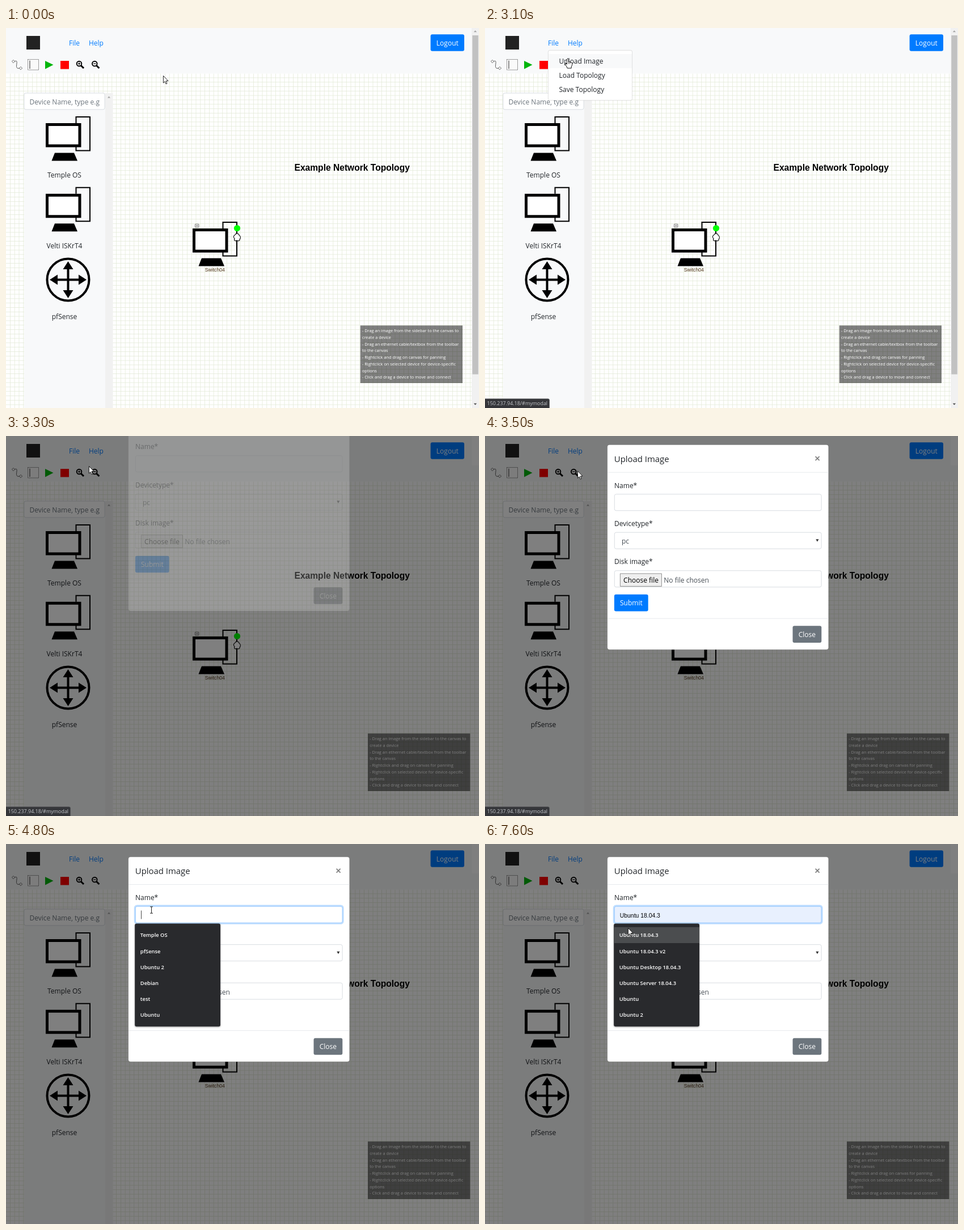
Recreate the animation shown at these times as an HTML page with a canvas. Size 834 px wide and 671 px high, loop 8 s.

```html
<!DOCTYPE html>
<html lang="en">
<head>
<meta charset="utf-8">
<title>Upload an image</title>
<style>
html, body { margin: 0; width: 100%; height: 100%; overflow: hidden; background: #fff; }
canvas { display: block; }
</style>
</head>
<body>
<canvas id="stage" width="834" height="671"></canvas>
<script>
const W = 834, H = 671, LOOP = 8000, STEP = 100;
const stage = document.getElementById('stage').getContext('2d');
const layer = Object.assign(document.createElement('canvas'), { width: W, height: H }).getContext('2d');
let c = stage;
const UI = '"Open Sans", "Noto Sans", sans-serif';
const ARIAL = '"Liberation Sans", Arial, sans-serif';
const INK = '#212529', BLUE = '#007bff', PALE = '#f8f9fa', EDGE = '#ced4da';

const clamp = v => Math.max(0, Math.min(1, v));
const smooth = p => p * p * (3 - 2 * p);

function easeOut(x) {
  let lo = 0, hi = 1, s = 0.5;
  for (let i = 0; i < 20; i++) {
    s = (lo + hi) / 2;
    if (3 * (1 - s) * s * s * 0.58 + s * s * s < x) lo = s; else hi = s;
  }
  return 3 * (1 - s) * s * s + s * s * s;
}

function rect(x, y, w, h, fill) {
  c.fillStyle = fill;
  c.fillRect(x, y, w, h);
}

function box(x, y, w, h, r, fill, stroke, width = 0.8) {
  c.beginPath();
  c.roundRect(x, y, w, h, r);
  if (fill) { c.fillStyle = fill; c.fill(); }
  if (stroke) { c.strokeStyle = stroke; c.lineWidth = width; c.stroke(); }
}

function text(s, x, y, color = INK, size = 12, align = 'left', family = UI, weight = 400) {
  c.font = `${weight} ${size}px ${family}`;
  c.textAlign = align;
  c.fillStyle = color;
  c.fillText(s, x, y);
}

function poly(points, fill, stroke, width = 1, close = true) {
  c.beginPath();
  points.forEach(([x, y]) => c.lineTo(x, y));
  if (close) c.closePath();
  if (fill) { c.fillStyle = fill; c.fill(); }
  if (stroke) { c.strokeStyle = stroke; c.lineWidth = width; c.stroke(); }
}

function disc(x, y, r, fill, stroke, width) {
  c.beginPath();
  c.arc(x, y, r, 0, Math.PI * 2);
  if (fill) { c.fillStyle = fill; c.fill(); }
  if (stroke) { c.strokeStyle = stroke; c.lineWidth = width; c.stroke(); }
}

function button(label, x, y, w, fill) {
  box(x, y, w, 29.6, 3, fill);
  text(label, x + w / 2, y + 19.5, '#fff', 12, 'center');
}

function at(x, y, draw) {
  c.save();
  c.translate(x, y);
  draw();
  c.restore();
}

// Draws a group on its own layer, then blends it in as one picture.
function group(alpha, dy, draw) {
  c = layer;
  c.clearRect(0, 0, W, H);
  at(0, dy, draw);
  c = stage;
  c.globalAlpha = alpha;
  c.drawImage(layer.canvas, 0, 0);
  c.globalAlpha = 1;
}

// Page

function grid() {
  const gap = 7.8, top = 80.5;
  rect(0, top, W, H - top, '#fff');
  for (let x = 7; x < W; x += gap) rect(x, top, 0.78, H - top, '#e3ead8');
  for (let y = top + 7; y < H; y += gap) rect(0, y, W, 0.78, '#e3ead8');
}

function computer(x, y) {
  at(x, y, () => {
    poly([[53.5, 12], [53.5, 1], [78, 1], [78, 60.5], [53.5, 60.5], [53.5, 54]], null, '#000', 2, false);
    box(2.5, 14.5, 57.5, 37.5, 0, '#fff', '#000', 5);
    poly([[16, 64.5], [50, 64.5], [56, 78.5], [10.5, 78.5]], '#000');
  });
}

function routerIcon() {
  at(109.5, 444.5, () => {
    disc(0, 0, 37, null, '#000', 4);
    for (let i = 0; i < 4; i++) {
      rect(-2, -24, 4, 24, '#000');
      poly([[0, -32.5], [9, -18.5], [-9, -18.5]], '#000');
      c.rotate(Math.PI / 2);
    }
  });
}

function lens(x, plus) {
  disc(x, 63, 4.3, '#fff', '#000', 1.9);
  poly([[x + 3.2, 66.2], [x + 8, 71]], null, '#000', 3, false);
  rect(x - 2.3, 62.4, 4.6, 1.2, '#000');
  if (plus) rect(x - 0.6, 60.7, 1.2, 4.6, '#000');
}

function toolbar() {
  c.beginPath();
  c.moveTo(15, 59);
  c.bezierCurveTo(25, 54, 12, 74, 24, 71);
  c.strokeStyle = '#555';
  c.lineWidth = 1;
  c.stroke();
  for (const [x, y] of [[13, 59], [26, 71]])
    poly([[x - 2.6, y], [x, y - 2.6], [x + 2.6, y], [x, y + 2.6]], '#fff', '#555', 0.9);
  c.setLineDash([1, 1]);
  box(38.5, 55.5, 19, 18.5, 0, '#fafafa', '#444', 1);
  c.setLineDash([]);
  rect(41.5, 57.5, 1, 14.5, '#222');
  poly([[69, 58], [83.5, 65], [69, 72.5]], '#00b50c');
  rect(96, 58, 15, 14.5, '#f00');
  lens(129, true);
  lens(156.3, false);
}

function device() {
  computer(329, 342);
  box(333.5, 346.3, 6.4, 5.6, 0.5, '#fff', '#555', 0.8);
  rect(335, 348.7, 3.5, 0.9, '#222');
  disc(407.5, 353.5, 5.6, '#0f0');
  c.beginPath();
  c.moveTo(404, 365.5);
  c.bezierCurveTo(404, 362, 411, 362, 411, 366);
  c.bezierCurveTo(414, 367, 414, 372, 412, 373);
  c.bezierCurveTo(413, 376, 408, 376.5, 407, 375);
  c.bezierCurveTo(404, 377, 401.5, 375, 403, 372);
  c.bezierCurveTo(400.5, 370, 401, 366, 404, 365.5);
  c.fillStyle = '#fff';
  c.fill();
  c.strokeStyle = '#000';
  c.lineWidth = 1.1;
  c.stroke();
  text('Switch04', 368.3, 430.3, '#4a3010', 8.6, 'center', ARIAL);
}

const TIPS = [
  '- Drag an image from the sidebar to the canvas to', 'create a device',
  '- Drag an ethernet cable/textbox from the toolbar', 'to the canvas',
  '- Rightclick and drag on canvas for panning',
  '- Rightclick on selected device for device-specific', 'options',
  '- Click and drag a device to move and connect'
];

function sidebar() {
  rect(32, 115, 143, H - 115, PALE);
  rect(175, 115, 13.5, H - 115, '#f1f1f1');
  poly([[179, 123.5], [181.5, 120.5], [184, 123.5]], '#a3a3a3');
  box(31.9, 114.9, 142.2, 29, 3, '#fff', EDGE);
  text('Device Name, type e.g', 41.5, 135, '#6c757d');
  computer(70, 156);
  text('Temple OS', 103, 264, INK, 12, 'center');
  computer(70, 280.7);
  text('Velti ISKrT4', 103, 388.5, INK, 12, 'center');
  routerIcon();
  text('pfSense', 103, 513.5, INK, 12, 'center');
}

function page(t) {
  const locked = t >= 3200, hover = t >= 1800 && t < 2600;
  grid();
  rect(0, 0, W, 80.5, PALE);
  if (locked) rect(821, 0, 13, 52, '#fff');
  rect(36, 14, 24, 24, '#222');
  text('File', 111, 31, hover ? '#0056b3' : BLUE);
  if (hover) rect(111, 32.6, 19, 0.9, '#0056b3');
  text('Help', 146, 31, BLUE);
  button('Logout', 748.6, 11.2, 59.4, BLUE);
  toolbar();
  sidebar();
  text('Example Network Topology', 508.5, 251.5, '#000', 15.6, 'left', ARIAL, 700);
  device();

  const tipX = locked ? 638 : 624.7;
  rect(tipX, 525.3, 180.3, 101.7, 'rgba(0,0,0,.5)');
  TIPS.forEach((s, i) => text(s, tipX + 3.2, 537 + i * 11.75, '#fff', 7.4, 'left', UI, 500));

  if (!locked) {
    rect(821, 0, 13, H, '#f1f1f1');
    rect(822.3, 13, 10.5, 598.5, '#c1c1c1');
    poly([[824.7, 7.2], [827.4, 4.2], [830.1, 7.2]], '#a3a3a3');
    poly([[824.7, 662.8], [827.4, 665.8], [830.1, 662.8]], '#505050');
  }
}

function fileMenu(t) {
  if (t < 2100 || t >= 3200) return;
  box(111.4, 39.4, 148.2, 88.4, 3, '#fff', 'rgba(0,0,0,.15)');
  if (t >= 2800) rect(112, 46, 147, 25, PALE);
  ['Upload Image', 'Load Topology', 'Save Topology'].forEach((s, i) =>
    text(s, 130.5, 62.7 + i * 25));
}

// Dialog

const HISTORY = ['Temple OS', 'pfSense', 'Ubuntu 2', 'Debian', 'test', 'Ubuntu'];
const MATCHES = ['Ubuntu 18.04.3', 'Ubuntu 18.04.3 v2', 'Ubuntu Desktop 18.04.3',
  'Ubuntu Server 18.04.3', 'Ubuntu', 'Ubuntu 2'];
const KEYS = [5400, 6000, 6300, 6600, 6900, 7100];

function nameField(t) {
  const focus = t >= 4500, filled = t >= 7300;
  if (focus) box(227, 108.7, 367.4, 31.8, 4, null, 'rgba(0,123,255,.25)', 2.5);
  box(228.3, 110.2, 364.8, 29, 3, filled ? '#e8f0fe' : '#fff', focus ? '#80bdff' : EDGE);
  if (filled) {
    text('Ubuntu 18.04.3', 237.8, 130, '#000', 10.4, 'left', ARIAL);
    return;
  }
  const typed = 'ubuntu'.slice(0, KEYS.filter(k => t >= k).length);
  text(typed, 238, 130, '#495057');
  const blank = (t >= 5200 && t < 5400) || (t >= 5900 && t < 6000);
  if (focus && !blank) rect(238 + c.measureText(typed).width, 117.5, 0.9, 15, '#333');
}

function form(t) {
  box(215.7, 22.8, 390, 361.8, 4, '#fff', 'rgba(0,0,0,.2)');
  text('Upload Image', 227.8, 53.2, INK, 14.9, 'left', UI, 500);
  poly([[582.6, 43.6], [589.6, 50.6]], null, '#7f7f7f', 1.7, false);
  poly([[589.6, 43.6], [582.6, 50.6]], null, '#7f7f7f', 1.7, false);
  rect(216, 71.2, 389.4, 0.8, '#e2e5e9');
  text('Name*', 228, 99);
  nameField(t);
  text('Devicetype*', 228, 166.3);
  box(228.3, 177.6, 364.8, 29, 3, '#fff', EDGE);
  text('pc', 241, 197.7, '#495057');
  poly([[583.3, 189.7], [588.5, 189.7], [585.9, 194.2]], '#333');
  text('Disk image*', 228, 233.8);
  box(228.3, 245.2, 364.8, 29, 3, '#fff', EDGE);
  box(238.4, 250.4, 73, 22.4, 0, '#efefef', '#767676');
  text('Choose file', 275, 266.3, '#000', 12, 'center');
  text('No file chosen', 315.3, 266.3, '#495057');
  button('Submit', 227.9, 287.2, 59.8, BLUE);
  rect(216, 329.2, 389.4, 0.8, '#e2e5e9');
  button('Close', 542.5, 342.7, 50.8, '#6c757d');
}

function dialog(t) {
  const age = t - 3270;
  if (age < 0) return;
  group(clamp(age / 150), -90 * (1 - easeOut(clamp(age / 300))), () => form(t));
}

function suggestions(t) {
  if (t < 4800) return;
  c.save();
  c.shadowColor = 'rgba(0,0,0,.4)';
  c.shadowBlur = 3;
  c.shadowOffsetY = 1;
  box(227.2, 140.6, 150.8, 181.6, 3, '#292a2d');
  c.restore();
  if (t >= 7300) rect(227.2, 146.8, 150.8, 28.2, '#4b4d4f');
  (t < 5400 ? HISTORY : MATCHES).forEach((s, i) =>
    text(s, 236.8, 164.4 + i * 28.2, '#fff', 9.4, 'left', UI, 600));
}

function statusBar(t) {
  if (t < 1900 || t >= 3600) return;
  const onItem = t >= 2800;
  box(-2, 654.7, (onItem ? 113.6 : 75.2) + 2, 20, 2.5, '#35363a', '#5a5b5e', 0.6);
  text('150.237.94.18/#' + (onItem ? 'mymodal' : ''), 3.6, 666.3, '#c4c7cb', 8.95);
}

// Pointer

const POINTER = {
  arrow() {
    poly([[0.4, 0.4], [0.4, 13], [3.2, 10.4], [5.1, 14.8], [7, 14], [5.1, 9.6], [9, 9.4]], '#fff', '#000', 0.85);
  },
  hand() {
    c.beginPath();
    c.moveTo(-1.6, 11);
    c.lineTo(-1.6, 2);
    c.quadraticCurveTo(0, -0.6, 1.4, 2);
    c.lineTo(1.4, 7);
    c.quadraticCurveTo(3, 5.6, 3.9, 7.4);
    c.quadraticCurveTo(5.4, 6.3, 6, 8.2);
    c.quadraticCurveTo(7.7, 7.6, 7.9, 9.6);
    c.quadraticCurveTo(8, 13, 6.2, 15.2);
    c.lineTo(6.2, 18);
    c.lineTo(-0.8, 18);
    c.quadraticCurveTo(-1.2, 15.6, -4.6, 11.4);
    c.quadraticCurveTo(-5, 8.6, -1.6, 11);
    c.fillStyle = '#fff';
    c.fill();
    c.strokeStyle = '#000';
    c.lineWidth = 0.95;
    c.stroke();
    for (const x of [1.4, 3.9]) rect(x - 0.3, 7, 0.7, 3.5, '#000');
  },
  beam() {
    rect(-0.5, -5.5, 1, 11, '#222');
    for (const y of [-6.2, 5.2]) rect(-2.5, y, 5, 1, '#222');
  }
};

// time, x, y of the pointer's resting points
const PATH = [[0, 277, 84], [400, 277, 84], [500, 279, 87], [900, 279, 87], [1800, 124, 31],
  [2300, 124, 31], [3100, 146, 53], [3300, 146, 53], [4100, 255, 107], [4200, 255, 107],
  [4500, 256.5, 116.5], [7200, 256.5, 116.5], [7300, 260, 151], [7400, 262, 147],
  [7500, 262, 147], [7600, 252, 148], [8000, 252, 148]];

function pointer(t) {
  const i = PATH.findIndex(p => p[0] > t);
  const [t0, x0, y0] = PATH[i - 1], [t1, x1, y1] = PATH[i];
  const p = smooth((t - t0) / (t1 - t0));
  let kind = 'arrow';
  if (t >= 1800 && t < 3200) kind = 'hand';
  if (t >= 4400 && t < 7300) kind = 'beam';
  at(x0 + (x1 - x0) * p, y0 + (y1 - y0) * p, POINTER[kind]);
}

function draw(t) {
  c.clearRect(0, 0, W, H);
  page(t);
  fileMenu(t);
  rect(0, 0, W, H, `rgba(0,0,0,${0.5 * clamp((t - 3135) / 150)})`);
  dialog(t);
  suggestions(t);
  statusBar(t);
  pointer(t);
}

const start = performance.now();
let shown = -1;
function tick() {
  const t = Math.floor(((performance.now() - start) % LOOP) / STEP) * STEP;
  if (t !== shown) draw(shown = t);
  requestAnimationFrame(tick);
}
tick();
</script>
</body>
</html>
```
